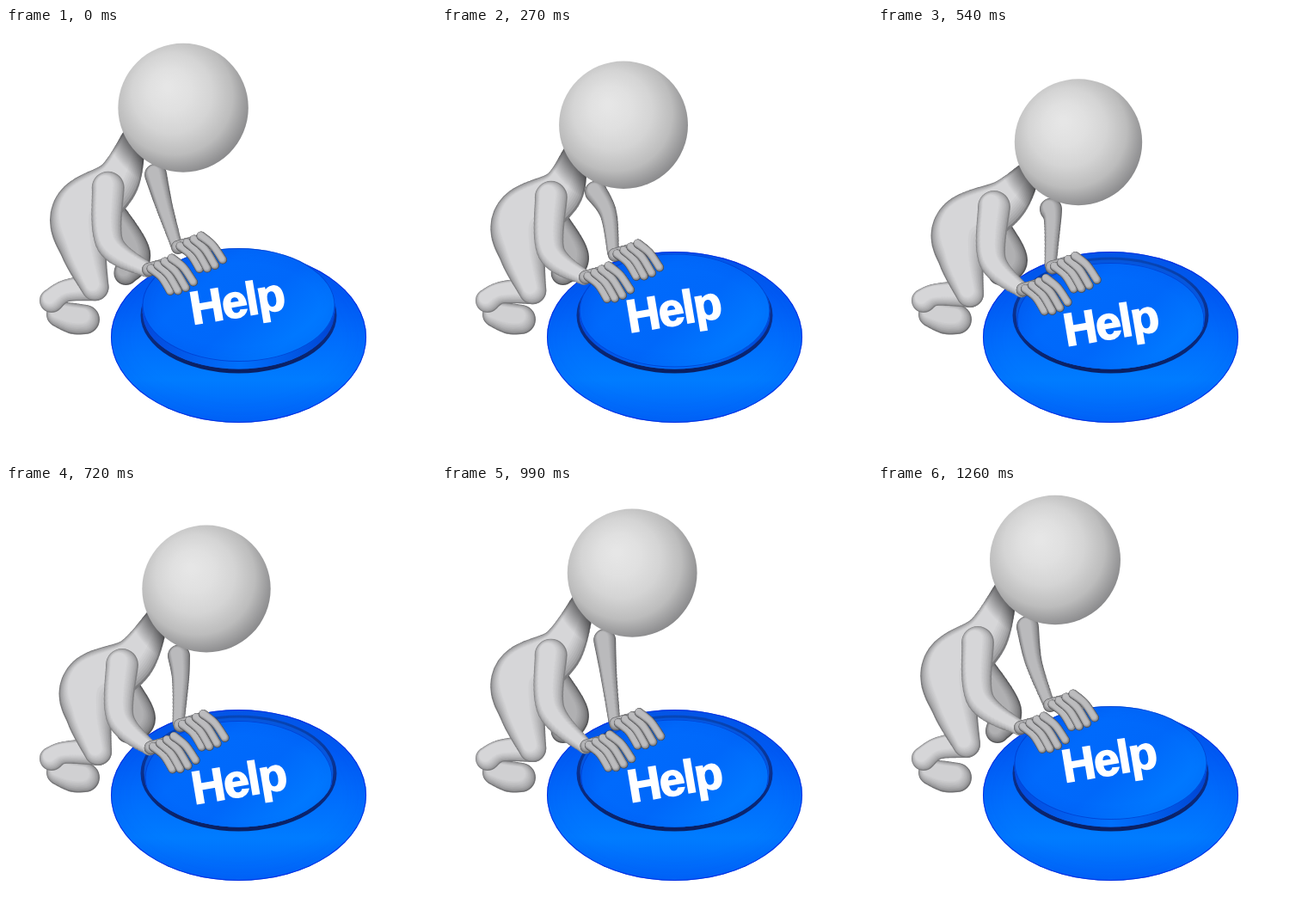
An HTML page with a canvas for the animation above (1.41 s loop, 500 by 500 pixels).

```html
<!DOCTYPE html>
<html lang="en">
<head>
<meta charset="utf-8">
<title>Help button</title>
<style>
html, body { margin: 0; width: 100%; height: 100%; overflow: hidden; background: #fff; }
canvas { display: block; }
</style>
</head>
<body>
<canvas id="stage" width="500" height="500"></canvas>
<script>
const ctx = document.getElementById('stage').getContext('2d');
const LOOP = 1410, STEP = 90, LAST = 14, LOWEST = 6;

const clamp = v => Math.max(0, Math.min(1, v));

// Leans down until LOWEST, then rises; the button follows with a sine ease.
function poseAt(step) {
  const down = step <= LOWEST;
  const p = down ? (step + 1) / (LOWEST + 1) : (LAST - step) / (LAST - LOWEST);
  const crouch = down ? p : Math.min(1, 1.5 * p);
  const lean = down ? p ** 3 : crouch;
  const low = down ? p : p ** 1.15;
  const press = clamp(down ? (p - 0.43) / 0.57 : 2 * p);
  return {
    x: 206 + 27 * lean,
    y: 86 + 46.7 * low,
    r: 76 - 1.8 * low,
    crouch,
    depth: 26 * Math.sin(press * Math.PI / 2),
  };
}

function oval(x, y, rx, ry) {
  const path = new Path2D();
  path.ellipse(x, y, rx, ry, 0, 0, 7);
  return path;
}

function shade(gradient, colors) {
  colors.forEach((c, i) => gradient.addColorStop(i / (colors.length - 1), c));
  return gradient;
}
const linear = (x0, y0, x1, y1, ...colors) =>
  shade(ctx.createLinearGradient(x0, y0, x1, y1), colors);

function fill(path, style) {
  ctx.fillStyle = style;
  ctx.fill(path);
}

// Fills a shape and darkens it softly along its inner edge.
function solid(path, style, edge, blur) {
  fill(path, style);
  ctx.save();
  ctx.clip(path);
  ctx.shadowColor = ctx.strokeStyle = edge;
  ctx.shadowBlur = blur;
  ctx.lineWidth = 2;
  ctx.stroke(path);
  ctx.restore();
}

// Smooth curve through a list of [x, y, radius] joints.
function sample(joints, perSegment = 14) {
  const points = [], last = joints.length - 1;
  for (let i = 0; i < last; i++) {
    const a = joints[Math.max(0, i - 1)], b = joints[i];
    const c = joints[i + 1], d = joints[Math.min(last, i + 2)];
    for (let n = 0; n <= perSegment; n++) {
      const t = n / perSegment;
      points.push(b.map((v, k) => v + t / 2 * (c[k] - a[k] +
        t * (2 * a[k] - 5 * v + 4 * c[k] - d[k] + t * (3 * (v - c[k]) + d[k] - a[k])))));
    }
  }
  return points;
}

// Rounded limb, lit from the upper left by stacking ever smaller, lighter layers.
function tube(joints, dark = 122, light = 214) {
  const points = sample(joints), layers = 9;
  let outline;
  for (let i = 0; i < layers; i++) {
    const k = i / (layers - 1), path = new Path2D();
    for (const [x, y, r] of points) {
      const cx = x - r * k * 0.2, cy = y - r * k * 0.25, size = r * (1 - 0.5 * k);
      path.moveTo(cx + size, cy);
      path.arc(cx, cy, size, 0, 7);
    }
    const grey = dark + (light - dark) * Math.sqrt(k);
    fill(path, `rgb(${grey}, ${grey}, ${grey + 2})`);
    outline = outline || path;
  }
  return outline;
}

function drawButton(depth) {
  solid(oval(270.5, 359.5, 148.5, 99.5),
    linear(0, 260, 0, 459, '#0458e6', '#005cf4', '#006cfc', '#007cff', '#0064f8'),
    'rgba(0,40,225,.9)', 22);
  fill(oval(270.5, 334, 114, 67.5), linear(0, 266, 0, 402, '#0646b8', '#0a2f8c', '#0a1f60'));
  fill(oval(270.5, 333, 110, 63.5), '#0656dc');

  // The cap is free above the groove and hidden by its front lip.
  ctx.save();
  const well = oval(270.5, 332, 111.5, 64.5);
  well.rect(157, 200, 228, 132);
  ctx.clip(well);
  const rx = 112 - depth * 0.12, y = 322 + depth * 0.65;
  const wall = oval(270.5, y + 9, rx, 66);
  wall.rect(270.5 - rx, y, rx * 2, 9);
  fill(wall, linear(158, 0, 384, 0, '#0348dc', '#0070fc', '#0044d4'));
  solid(oval(270.5, y, rx, 66),
    linear(190, y - 62, 300, y + 66, '#005cf2', '#006afc', '#0068fa', '#0078ff'),
    'rgba(0,55,200,.7)', 14);
  ctx.restore();

  ctx.save();
  ctx.translate(217 + depth * 0.08, 345 + depth * 0.97);
  ctx.rotate(-0.165);
  ctx.font = 'bold 54px Arial, "Liberation Sans", sans-serif';
  ctx.letterSpacing = '-1.8px';
  ctx.fillStyle = ctx.strokeStyle = '#fff';
  ctx.lineWidth = 1.6;
  ctx.fillText('Help', 0, 0);
  ctx.strokeText('Help', 0, 0);
  ctx.restore();
}

function drawHand(x, y) {
  tube([[x - 1, y + 2, 8], [x + 24, y - 5, 8]], 85, 180);
  for (let i = 0; i < 4; i++) {
    const startX = x + 2 + 8 * i, startY = y + 1 - 4 * i;
    const tipX = x + 24 + 9 * i, tipY = y + 27 + i - 1.5 * i * i;
    tube([
      [startX, startY, 5.5],
      [(startX + tipX) / 2 + 1, (startY + tipY) / 2 - 3, 5],
      [tipX, tipY, 5],
    ], 65, 188);
  }
}

function drawFigure({ x, y, r, crouch, depth }) {
  // Joint of the standing pose, moved by (dx, dy) when fully crouched.
  const joint = (jx, jy, dx, dy, radius) => [jx + dx * crouch, jy + dy * crouch, radius];
  const handX = 167 + depth * 0.1, handY = 279 + depth * 0.9;
  const farX = handX + 34, farY = handY - 26;
  const knee = joint(103, 300, 4, 9, 16);

  // Far leg and arm
  tube([joint(118, 215, 17, 20, 20), joint(147, 261, 7, 9, 20), joint(139, 285, 3, 0, 14)], 85, 176);
  tube([[x - 32, y + 78, 13], joint(181, 205, 22, 20, 10), [farX - 3, farY - 1, 7]], 95, 186);
  drawHand(farX, farY);

  // Foot, shin, then trunk with the near thigh
  tube([[62, 333, 15], [79, 338, 18], [92, 339, 17]], 112, 208);
  tube([knee, joint(70, 305, -2, 5, 13), [53, 317, 14]], 122);
  const trunk = tube([
    [x - 58, y + 36, 14], joint(126, 174, 22, 28, 26), joint(87, 212, 14, 20, 36),
    joint(89, 255, 8, 12, 27), knee,
  ]);

  // Soft shadow below the head
  ctx.save();
  ctx.clip(trunk);
  fill(oval(x, y, r + 22, r + 22), shade(
    ctx.createRadialGradient(x, y, r, x, y, r + 22), ['rgba(40,40,42,.6)', 'rgba(40,40,42,0)']));
  ctx.restore();

  tube([joint(116, 182, 19, 26, 19), joint(119, 248, 14, 22, 16), [handX - 3, handY + 2, 9]], 128);
  drawHand(handX, handY);

  fill(oval(x, y, r, r * 0.99), shade(
    ctx.createRadialGradient(x - 18, y - 24, 4, x - 8, y - 10, r * 1.18),
    ['#e6e6e6', '#e0e0e0', '#d4d4d4', '#bcbcbc', '#868688']));
}

function frame(now) {
  const pose = poseAt(Math.min(LAST, Math.floor((now % LOOP) / STEP)));
  ctx.clearRect(0, 0, 500, 500);
  drawButton(pose.depth);
  drawFigure(pose);
  requestAnimationFrame(frame);
}
frame(0);
</script>
</body>
</html>
```
